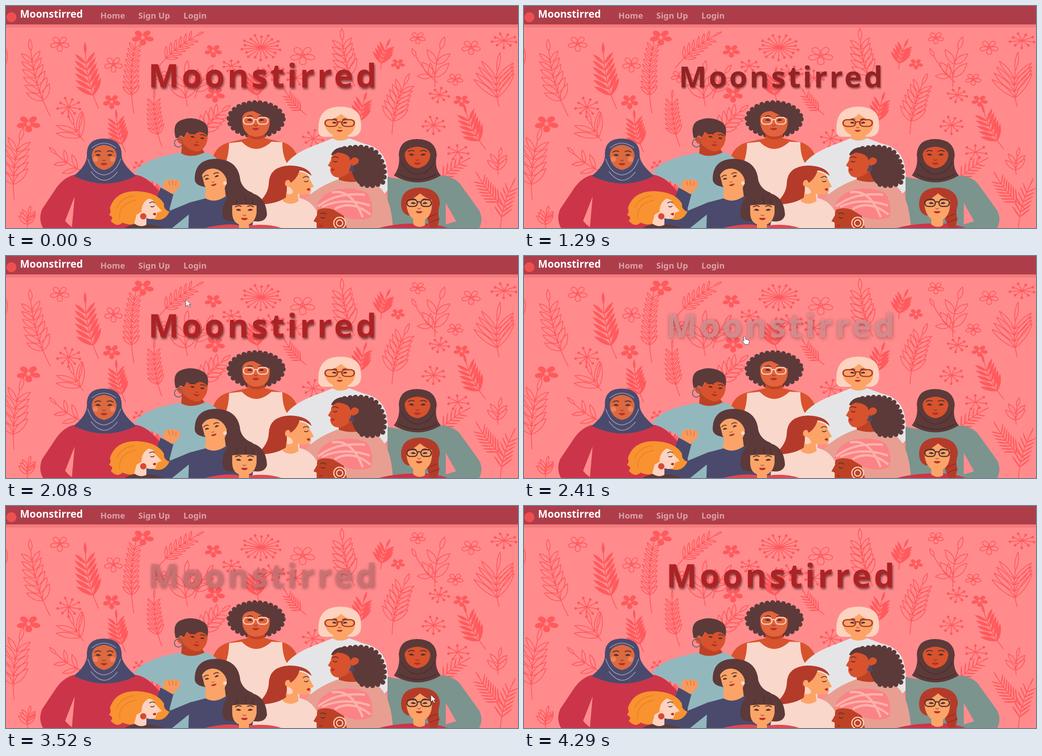
These frames come from a looping animation (1134 px wide and 494 px high, 4520 ms). An HTML page:

```html
<!DOCTYPE html>
<html lang="en">
<head>
<meta charset="utf-8">
<title>Moonstirred</title>
<style>
html, body { margin: 0; width: 100%; height: 100%; overflow: hidden; background: #ff8b8d; }
body { position: relative; font-family: "Noto Sans", "Open Sans", sans-serif; }
svg { position: absolute; left: 0; top: 0; overflow: hidden; }
nav { position: absolute; left: 0; top: 0; width: 1134px; height: 41px; background: #ae3d4a; border-bottom: 7px solid #f47b7c; }
nav span { position: absolute; white-space: nowrap; font-weight: 700; font-size: 18.5px; line-height: 26px; top: 8px; color: #dba3a9; }
nav .brand { left: 31px; top: 2px; font-size: 22.5px; line-height: 31px; color: #fff; }
nav i { position: absolute; left: 1px; top: 14px; width: 22px; height: 22px; border-radius: 50%; background: #ee5052; }
h1 { position: absolute; left: 4px; top: 103px; width: 1134px; margin: 0; text-align: center; font-size: 72px; line-height: 100px; white-space: nowrap; }
h1 span { line-height: 0; animation: title 4520ms infinite; }

@keyframes title {
  0%, 20.353%, 37%, 48% { font-size: 72px; letter-spacing: 6px; font-weight: 700; color: #ae2224; text-shadow: 2px 4px 4px rgba(0,0,0,.5); }
  20.354% { font-size: 39px; letter-spacing: 0; font-weight: 500; color: #212529; text-shadow: 0 0 0 rgba(0,0,0,0); }
  63.5%, 73% { font-size: 72px; letter-spacing: 6px; font-weight: 700; color: rgba(255,255,255,.7); text-shadow: 0 0 12px rgba(120,30,40,.3); }
  88.5%, 100% { font-size: 72px; letter-spacing: 6px; font-weight: 700; color: #ae2224; text-shadow: 2px 4px 4px rgba(0,0,0,.5); }
}
#cursor { animation: move 4520ms linear infinite, show 4520ms step-end infinite; }
#arrow { animation: arrow 4520ms step-end infinite; }
#hand { animation: hand 4520ms step-end infinite; }
@keyframes move {
  0%, 41.15% { transform: translate(294px, 13px); }
  48% { transform: translate(440px, 130px); }
  52%, 53.4% { transform: translate(487px, 178px); }
  55.1% { transform: translate(530px, 201px); }
  57.5% { transform: translate(610px, 80px); }
  60.2%, 70.79% { transform: translate(690px, 140px); }
  70.8% { transform: translate(798px, 362px); }
  77.8%, 78% { transform: translate(941px, 420px); }
  79.6%, 89.8% { transform: translate(940px, 436px); }
  89.81%, 100% { transform: translate(1066px, 483px); }
}
@keyframes show { 0%, 81.2%, 94.9% { opacity: 0; } 41.15%, 89.82% { opacity: 1; } }
@keyframes arrow { 0%, 70.8% { opacity: 1; } 48% { opacity: 0; } }
@keyframes hand { 0%, 70.8% { opacity: 0; } 48% { opacity: 1; } }

.brown { fill: #5c3a39; }
.dark { fill: #d8522d; }
.deep { fill: #bd4125; }
.tan { fill: #fca468; }
.pale { fill: #fdd2bf; }
.cream { fill: #f9d7cb; }
.rust { fill: #b43b2a; }
.navy { fill: #4b4a6c; }
.pink { fill: #ff8b8d; }
.ink { fill: none; stroke: #512f30; stroke-width: 2; stroke-linecap: round; }
.curls { stroke: #5c3a39; stroke-width: 11; stroke-linecap: round; stroke-dasharray: 0 12; }
</style>
</head>
<body>
<svg width="1134" height="494" viewBox="0 0 1134 494">
  <defs>
    <g id="front">
      <path class="ink" d="M-20-7q7-5 13-1M7-8q7-4 13 1"/>
      <path fill="#512f30" d="M-19 0q6-6 12 1q-6 2-12-1zM7 1q6-7 12-1q-6 3-12 1z"/>
      <path class="ink" stroke-width="1.2" opacity=".5" d="M-3 11q3 3 6 0"/>
      <path fill="#b92f2a" d="M-8 19q4-3 8-1q4-2 8 1q-8 7-16 0z"/>
    </g>
    <g id="side">
      <path class="ink" d="M-13-9q7-5 13-1M-10 0q5 3 9-1"/>
      <path fill="#b92f2a" d="M-5 20q5-5 9-2l-1 5q-4 2-8-3z"/>
    </g>
    <g id="specs" fill="none" stroke-width="2.5">
      <rect x="-27" y="-7" width="23" height="15" rx="7"/>
      <rect x="4" y="-7" width="23" height="15" rx="7"/>
      <path d="M-4-1q4-3 8 0"/>
    </g>
  </defs>

  <g stroke="#ff5a5d" stroke-width="1.8" stroke-linecap="round" stroke-linejoin="round">
    <path id="lines" fill="none"/>
    <path id="solids" fill="#ff5a5d" stroke-width="1"/>
    <path id="hearts" class="pink" stroke="none"/>
  </g>

  <g id="afro">
    <ellipse class="brown" cx="554" cy="252" rx="61" ry="38"/>
    <ellipse class="curls" fill="none" cx="554" cy="252" rx="60" ry="37"/>
    <path class="dark" d="M455 494V350Q460 313 492 304L535 294V278H573V294L616 304Q643 314 650 350V494Z"/>
    <path class="deep" d="M536 280H572V292Q553 302 536 290Z"/>
    <path class="cream" d="M494 305L522 302Q553 334 588 302L612 303Q612 335 624 352L650 400V494H478L486 350Q494 330 494 305Z"/>
    <path fill="#e2633c" d="M523 250Q525 234 548 234Q572 246 584 250Q587 290 553 291Q522 288 523 250Z"/>
    <use href="#front" x="553" y="254"/>
    <use href="#specs" x="553" y="255" stroke="#fdd2bf"/>
  </g>

  <g id="cropped">
    <path fill="#92b8be" d="M284 372Q300 341 388 326Q412 338 440 325Q466 333 475 350L500 494H320L345 400Z"/>
    <path class="deep" d="M390 305L388 328Q410 340 440 326L430 312Z"/>
    <path class="dark" d="M379 296Q384 284 394 294L404 276 446 277Q449 300 440 313Q431 326 418 323Q402 318 393 307Q380 308 379 296Z"/>
    <path class="brown" d="M376 294Q367 262 388 254Q412 244 436 257Q452 266 446 290Q440 280 428 280Q410 290 401 280L394 293Q386 284 382 293Z"/>
    <use href="#front" transform="translate(424 293) rotate(8) scale(.85)"/>
    <circle cx="382" cy="305" r="9" fill="none" stroke="#5d6470" stroke-width="2"/>
  </g>

  <g id="silver">
    <path fill="#e5e5e7" d="M620 352Q638 325 700 304L724 294Q742 304 760 294L792 306Q832 314 842 350L850 405 838 418H650Z"/>
    <path class="pale" d="M692 275Q690 224 741 224Q786 225 786 260Q790 285 770 291H708Q690 292 692 275Z"/>
    <path class="tan" d="M706 255Q730 252 742 240Q755 252 773 254Q776 280 757 288V295Q740 304 724 295V287Q705 278 706 255Z"/>
    <use href="#front" x="739" y="260" transform="translate(74 26) scale(.9)"/>
    <use href="#specs" transform="translate(739 260) scale(1.2 1)" stroke="#a83627" stroke-width="3"/>
  </g>

  <g id="hijab-left">
    <path fill="#cc3549" d="M150 376Q128 382 112 404L80 452Q71 474 82 494H345L345 420Q318 382 290 376Z"/>
    <path class="pink" d="M152 424L131 478Q138 487 146 492Z"/>
    <path class="navy" d="M179 328Q180 295 217 295Q256 296 256 330Q255 350 288 378Q220 412 150 378Q182 352 179 328Z"/>
    <path fill="#dc693f" d="M190 333Q190 312 217 309Q244 312 245 333Q242 360 217 365Q193 360 190 333Z"/>
    <g fill="#f0825b"><circle cx="198" cy="341" r="6"/><circle cx="236" cy="341" r="6"/></g>
    <use href="#front" x="217" y="332"/>
    <path d="M181 340Q192 374 217 376Q243 373 254 340M188 368Q217 407 247 369M190 316Q217 294 244 316" fill="none" stroke="#9a9cb8" stroke-width="1.6"/>
  </g>

  <g id="hijab-right">
    <path fill="#7b948e" d="M845 380Q900 394 960 377Q990 378 1005 395L1048 455Q1058 475 1048 494H845Z"/>
    <path class="pink" d="M974 438L997 479 974 486Z"/>
    <path class="brown" d="M870 330Q872 296 911 296Q952 297 954 332Q948 360 963 377Q912 408 859 377Q874 358 870 330Z"/>
    <path class="dark" d="M883 331Q884 315 911 313Q938 315 940 331Q937 357 911 361Q886 357 883 331Z"/>
    <use href="#front" x="911" y="331"/>
    <path d="M875 346Q890 374 912 374Q938 372 949 346M870 374Q912 398 954 374" fill="none" stroke="#472a2b" stroke-width="1.5"/>
  </g>

  <g id="curly">
    <path class="deep" d="M737 372V395Q760 412 778 390L768 355Z"/>
    <path fill="#e89f92" d="M663 430Q690 402 735 386Q765 396 790 388Q851 390 857 494H663Z"/>
    <path class="brown" d="M720 331Q728 312 755 314Q800 307 822 328Q845 360 834 393Q805 408 780 395Q762 375 765 345Z"/>
    <path class="curls" fill="none" d="M750 317Q800 308 820 326Q846 358 835 392Q810 406 783 395"/>
    <path class="dark" d="M735 326Q718 332 720 343L713 355 719 359 718 366Q722 384 742 381Q762 375 769 355Q784 351 781 341Q770 331 763 344Q762 329 735 326Z"/>
    <use href="#side" transform="translate(724 346) scale(-.9 .9)"/>
    <path class="navy" d="M766 352L759 367 773 368Z"/>
  </g>

  <g id="long-hair">
    <path class="brown" d="M418 385Q418 340 467 340Q515 343 519 388Q525 408 545 415Q560 428 557 450L490 440 470 408 437 402Q418 398 418 385Z"/>
    <path class="tan" d="M443 400L441 428Q462 444 487 425L483 393Z"/>
    <path class="navy" d="M342 404L371 418 362 452 408 437 442 428Q462 440 486 424L545 438 565 494H300L330 440Z"/>
    <path fill="#92b8be" d="M371 420L362 456 410 436 400 410Z"/>
    <path class="navy" d="M360 494L358 460 410 436 425 494Z"/>
    <path fill="#92b8be" d="M405 464L368 494H404Z"/>
    <path class="tan" d="M434 376Q444 360 462 362Q482 366 489 387Q488 412 466 415Q450 415 440 400Z"/>
    <use href="#front" transform="translate(456 382) rotate(-15) scale(.85)"/>
    <circle class="cream" cx="485" cy="394" r="4"/>
    <path fill="#f69a5e" d="M347 406L350 391Q356 384 364 387Q374 383 385 391Q388 404 377 411L369 419Z"/>
    <path d="M360 389l3 11M368 388l2 11M377 390l-1 10" fill="none" stroke="#d9703c" stroke-width="1.4"/>
  </g>

  <g id="profile">
    <path class="cream" d="M545 494Q550 450 575 440Q620 455 650 427Q690 436 702 494Z"/>
    <path class="tan" d="M645 368Q671 370 673 386L682 402 675 405Q679 420 660 420L646 418 648 434Q630 446 613 434L620 395Z"/>
    <path class="rust" d="M555 441Q581 420 582 395Q583 357 628 355Q670 356 677 378Q660 365 650 366Q645 385 628 395Q620 410 620 426Q595 443 555 441Z"/>
    <path class="tan" d="M618 398Q617 386 627 387L634 400 626 406Z"/>
    <use href="#side" transform="translate(670 390) scale(.9)"/>
    <path class="pale" d="M622 402q10 0 14 12q-6 8-14 3z"/>
  </g>

  <g id="fringe">
    <path fill="#df4952" d="M440 494Q490 482 515 488H545Q580 484 610 494Z"/>
    <path class="brown" d="M479 462Q480 414 528 414Q576 416 578 465Q574 482 550 479H500Q480 480 479 462Z"/>
    <path class="tan" d="M501 438H555V460Q552 480 538 486V494H516V486Q501 480 501 460Z"/>
    <path class="brown" d="M499 444Q502 428 528 428Q554 430 557 444Q528 440 499 444Z"/>
    <path class="ink" stroke="#8b5548" stroke-width="1" d="M512 429l-2 12M530 425l2 14M545 430l2 10"/>
    <use href="#front" x="528" y="454"/>
  </g>

  <g id="blonde">
    <path class="brown" d="M262 494Q285 480 325 487L352 494Z"/>
    <path fill="#f99230" d="M230 450Q242 411 290 412Q335 414 350 440Q348 452 362 458Q350 482 325 474L300 440 293 478Q280 492 258 482Q246 494 232 478Q240 470 228 465Q234 458 230 450Z"/>
    <path class="pale" d="M300 428Q328 426 330 440L345 456 335 460 331 472Q320 476 311 472V487Q298 494 284 484L293 450Z"/>
    <use href="#side" transform="translate(329 446) scale(.85)"/>
    <path fill="#f99230" d="M282 430Q305 416 320 426Q300 435 300 458L288 465Z"/>
    <circle cx="304" cy="468" r="7" fill="#d74a35"/>
    <path d="M245 450Q255 425 285 422M252 474Q248 440 288 432" fill="none" stroke="#e87c20" stroke-width="1.5"/>
  </g>

  <g id="turban">
    <path class="deep" d="M700 445Q687 453 689 465L681 479 688 482 688 494H755L745 455Z"/>
    <use href="#side" transform="translate(697 471) scale(-.9 .9)"/>
    <path fill="#fb8386" d="M688 455Q687 424 728 409Q772 401 800 416Q817 440 809 470Q785 480 755 471L725 453Q705 446 688 455Z"/>
    <path d="M691 446Q730 414 795 420M700 447Q745 424 806 444M728 452Q765 430 807 464M722 415Q765 405 790 470" fill="none" stroke="#fdb2ab" stroke-width="5"/>
    <g fill="none" stroke="#fdd2bf" stroke-width="2.5"><circle cx="739" cy="483" r="13"/><circle cx="739" cy="483" r="7"/></g>
  </g>

  <g id="braid">
    <path fill="#cc3549" d="M825 494Q860 485 895 484H935Q965 488 978 494Z"/>
    <path class="rust" d="M875 440Q876 404 918 404Q960 406 961 440Q955 460 960 474L955 494H940L930 466H890Q875 460 875 440Z"/>
    <path class="tan" d="M887 437Q904 428 917 417Q930 428 943 432Q946 464 928 475V488Q915 496 902 486V474Q887 462 887 437Z"/>
    <use href="#front" x="915" y="439"/>
    <use href="#specs" x="915" y="438" stroke="#512f30"/>
    <path d="M936 470l20-8M938 482l21-8" stroke="#8f2c20" stroke-width="1.5"/>
  </g>
</svg>

<nav>
  <i></i>
  <span class="brand">Moonstirred</span>
  <span style="left:209px">Home</span>
  <span style="left:293px">Sign Up</span>
  <span style="left:393px">Login</span>
</nav>
<h1><span>Moonstirred</span></h1>

<svg width="1134" height="494">
  <g id="cursor" fill="#fff" stroke="#222" stroke-width=".8" stroke-linejoin="round">
    <path id="arrow" d="M0 0V16L4 12.5 7 18.5 9.5 17.5 6.7 11.5H11.5Z"/>
    <path id="hand" d="M0 1.5Q2-1 3.5 1.5V7L10 9Q12 9.5 12 12L10.5 19H2.5L-3 11.5Q-3 9 0 11Z"/>
  </g>
</svg>

<script>
const art = { lines: '', solids: '', hearts: '' };
const polar = (x, y, r, a, squash = 1) =>
  (x + r * Math.cos(a)).toFixed(1) + ' ' + (y + r * squash * Math.sin(a)).toFixed(1) + ' ';

function leaf(layer, x, y, angle, length, width) {
  const tip = polar(x, y, length, angle);
  art[layer] += `M${x} ${y}Q${polar(x, y, length * .55, angle - width)}${tip}Q${polar(x, y, length * .55, angle + width)}${x} ${y}`;
}

// Paired leaves along a bowed stem, shrinking toward the tip.
function branch(layer, x0, y0, x1, y1, pairs, length, width = .6, bow = .1) {
  const cx = (x0 + x1) / 2 + (y1 - y0) * bow, cy = (y0 + y1) / 2 - (x1 - x0) * bow;
  art.lines += `M${x0} ${y0}Q${cx} ${cy} ${x1} ${y1}`;
  for (let i = 0; i < pairs; i++) {
    const t = .25 + .7 * i / pairs, u = 1 - t;
    const x = u * u * x0 + 2 * u * t * cx + t * t * x1;
    const y = u * u * y0 + 2 * u * t * cy + t * t * y1;
    const a = Math.atan2(u * (cy - y0) + t * (y1 - cy), u * (cx - x0) + t * (x1 - cx));
    for (const side of [-.75, .75]) leaf(layer, x, y, a + side, length * (1.1 - .4 * t), width);
  }
  leaf(layer, x1, y1, Math.atan2(y1 - cy, x1 - cx), length * .65, width);
}

function dot(layer, x, y, r) {
  art[layer] += `M${x - r} ${y}a${r} ${r} 0 1 0 ${2 * r} 0a${r} ${r} 0 1 0 ${-2 * r} 0`;
}

function flower(layer, x, y, r, squash = .85, turn = .3) {
  for (let i = 0; i < 5; i++) {
    const a = turn + i * Math.PI * .4;
    art[layer] += `M${x} ${y}C${polar(x, y, r * 1.5, a - .62, squash)}${polar(x, y, r * 1.5, a + .62, squash)}${x} ${y}`;
  }
  dot(layer === 'solids' ? 'hearts' : 'lines', x, y, r * .16);
}

function burst(x, y, r, rays, squash = .85) {
  for (let i = 0; i < rays; i++) {
    const a = i * 2 * Math.PI / rays + .2, reach = r * (i % 2 ? .85 : 1);
    art.lines += `M${x} ${y}L${polar(x, y, reach, a, squash)}`;
    dot('solids', x + reach * Math.cos(a), y + reach * squash * Math.sin(a), 2.6);
  }
}

branch('lines', 98, 245, 55, 100, 6, 40);
branch('lines', 283, 238, 288, 78, 9, 27, .5);
branch('lines', 335, 138, 422, 66, 6, 27, .4);
branch('lines', 402, 222, 398, 152, 2, 48);
branch('lines', 418, 205, 445, 150, 2, 36);
branch('lines', 772, 178, 745, 76, 5, 40);
branch('lines', 950, 180, 962, 96, 2, 44, .7);
branch('lines', 955, 170, 908, 112, 1, 30, .7);
branch('lines', 1092, 224, 1088, 145, 4, 66, .3);
branch('lines', 855, 285, 882, 175, 6, 42, .5);
branch('lines', 172, 300, 150, 265, 2, 55, .4);
branch('lines', 345, 312, 328, 205, 7, 27, .4);
branch('lines', 425, 295, 478, 235, 4, 36);
branch('lines', 18, 430, 30, 300, 5, 48, .5);
branch('lines', 175, 370, 112, 330, 2, 34, .5);
branch('lines', 48, 494, 50, 462, 3, 27);

branch('lines', 665, 242, 622, 195, 6, 20, .1);
branch('lines', 1108, 450, 1050, 385, 7, 28, .1);
branch('lines', 1095, 494, 1120, 400, 6, 28, .1);
branch('lines', 1090, 375, 1092, 335, 2, 32);
branch('lines', 955, 395, 1015, 345, 5, 24, .1);
branch('solids', 205, 228, 176, 108, 6, 42, .38);
branch('solids', 830, 140, 842, 92, 4, 32, .4);
branch('solids', 785, 270, 792, 212, 4, 34, .4);
branch('solids', 1062, 318, 1020, 240, 5, 38, .38);
branch('solids', 265, 325, 245, 252, 5, 34, .4);
branch('solids', 560, 212, 556, 158, 4, 36, .4);
branch('solids', 335, 430, 325, 400, 2, 25, .4);

flower('lines', 119, 84, 23, .8);
flower('lines', 238, 130, 22);
flower('lines', 343, 157, 19, .75);
flower('lines', 657, 110, 30, .75);
flower('lines', 912, 71, 19, .75);
flower('lines', 1030, 92, 23, .75);
flower('lines', 995, 163, 19, .75);
flower('solids', 303, 70, 27, .7);
flower('solids', 234, 213, 21);
flower('solids', 50, 262, 29, .7);
flower('solids', 459, 100, 21, .75);
flower('solids', 463, 197, 24, .8);
flower('solids', 868, 129, 17, .75);
flower('solids', 1009, 211, 20, .7);

burst(565, 92, 43, 18, .65);
burst(139, 225, 25, 9);
burst(499, 133, 20, 7, .65);
burst(590, 148, 27, 9, .6);
burst(642, 160, 22, 7);
burst(680, 295, 22, 8);
burst(1103, 77, 27, 9, .6);
burst(960, 198, 21, 8, .75);
burst(947, 265, 24, 9, .8);
burst(1000, 325, 24, 7, .7);
burst(295, 355, 12, 5);
leaf('lines', 0, 128, -1.7, 42, .5);

for (const id in art) document.getElementById(id).setAttribute('d', art[id]);
</script>
</body>
</html>
```
